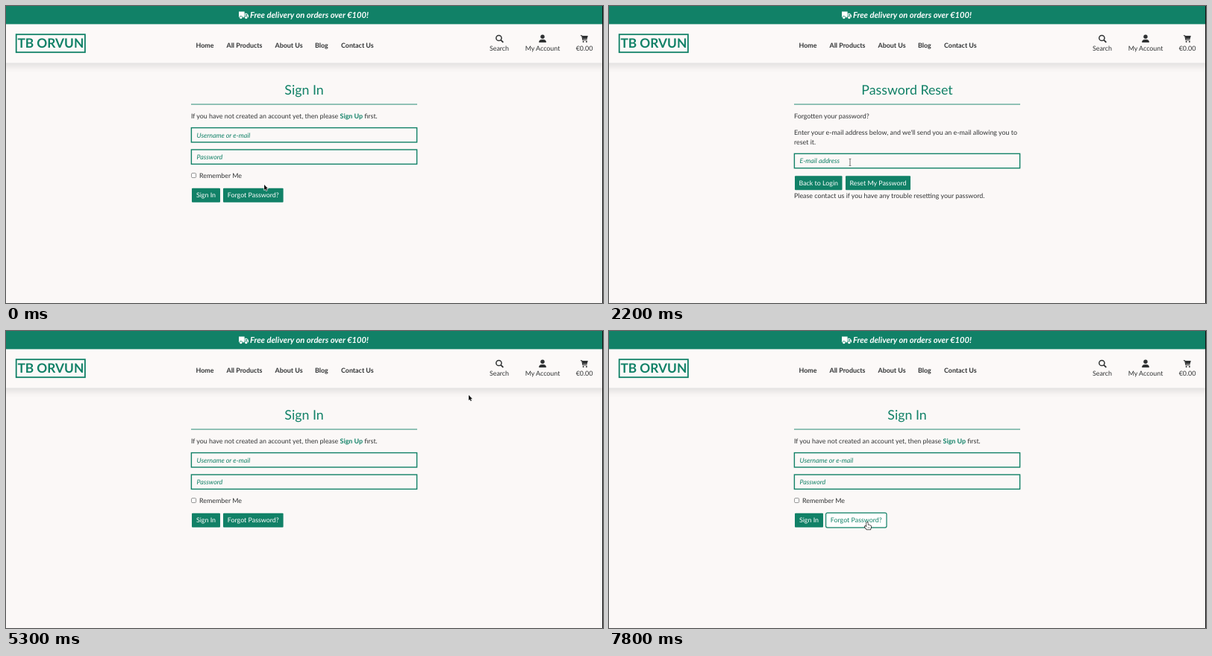
Recreate the animation shown at these times as an HTML page with a canvas. Size 800 by 399 pixels, loop 8 s.

```html
<!DOCTYPE html>
<html lang="en">
<head>
<meta charset="utf-8">
<title>Sign in and password reset</title>
<style>
html, body { margin: 0; width: 100%; height: 100%; overflow: hidden; background: #fbf8f7; }
canvas { display: block; width: 100%; height: 100%; }
</style>
</head>
<body>
<canvas id="stage"></canvas>
<script>
const W = 800, H = 399, LOOP = 8000, STEP = 100, REM = 8.89;
const GREEN = [17, 129, 103], PAPER = [251, 248, 247], WHITE = [255, 255, 255];
const rgb = c => `rgb(${c.map(Math.round).join()})`;
const mix = (a, b, k) => rgb(a.map((v, i) => v + (b[i] - v) * k));
const green = rgb(GREEN), paper = rgb(PAPER), ink = '#303233';
const EMAIL = 'vudot84029@tolvenk.com';

const canvas = document.getElementById('stage');
const ctx = canvas.getContext('2d');
const dpr = window.devicePixelRatio || 1;
canvas.width = W * dpr;
canvas.height = H * dpr;

// Pointer path: time, x, y of the hot spot
const PATH = [
  [0, 346, 240], [100, 346, 242], [300, 346, 246], [1100, 346, 246],
  [1200, 332, 228], [1500, 323, 210], [3400, 323, 210], [3600, 330, 230],
  [3800, 336, 233], [4000, 318, 233], [4200, 295, 232], [4800, 295, 232],
  [5100, 603, 100], [5200, 603, 100], [5300, 620, 86], [5500, 719, 54],
  [5900, 719, 54], [6300, 721, 93], [7100, 721, 93], [7500, 372, 278],
  [7600, 352, 262], [7800, 346, 257], [8000, 346, 257]
];

const ease = k => { k = Math.min(1, Math.max(0, k)); return k * k * (3 - 2 * k); };
const fade = (t, on, off = Infinity) => Math.min(ease((t - on) / 240), 1 - ease((t - off) / 240));
const within = (t, a, b) => t >= a && t < b;
const inside = (p, x, y, w, h) => within(p.x, x, x + w) && within(p.y, y, y + h);

function pointerAt(t) {
  const i = PATH.findIndex(p => p[0] > t);
  const [t0, x0, y0] = PATH[i - 1], [t1, x1, y1] = PATH[i];
  const k = (t - t0) / (t1 - t0);
  return { x: x0 + (x1 - x0) * k, y: y0 + (y1 - y0) * k };
}

function text(s, x, y, { size = REM, style = '', color = ink, align = 'left' } = {}) {
  ctx.font = `${style} ${size}px Lato, sans-serif`;
  ctx.textAlign = align;
  ctx.fillStyle = color;
  ctx.fillText(s, x, y);
  return ctx.measureText(s).width;
}

function rect(x, y, w, h, color) {
  ctx.fillStyle = color;
  ctx.fillRect(x, y, w, h);
}

function disc(x, y, r, color) {
  ctx.fillStyle = color;
  ctx.beginPath();
  ctx.arc(x, y, r, 0, Math.PI * 2);
  ctx.fill();
}

function line(points, color, width) {
  ctx.strokeStyle = color;
  ctx.lineWidth = width;
  ctx.beginPath();
  points.forEach(p => ctx.lineTo(...p));
  ctx.stroke();
}

function shape(d, x, y, fill, stroke, width) {
  const p = new Path2D(d);
  ctx.save();
  ctx.translate(x, y);
  ctx.lineJoin = 'round';
  if (stroke) {
    ctx.strokeStyle = stroke;
    ctx.lineWidth = width;
    ctx.stroke(p);
  }
  ctx.fillStyle = fill;
  ctx.fill(p);
  ctx.restore();
}

function button(label, x, y, w, h, k = 0) {
  ctx.beginPath();
  ctx.roundRect(x, y, w, h, 1);
  ctx.fillStyle = mix(GREEN, WHITE, k);
  ctx.fill();
  if (k > 0) {
    ctx.beginPath();
    ctx.roundRect(x - .4, y - .4, w + .8, h + .8, 2);
    ctx.strokeStyle = mix(PAPER, GREEN, k);
    ctx.lineWidth = 1.2;
    ctx.stroke();
  }
  text(label, x + w / 2, y + h / 2 + 3.1, { color: mix(WHITE, GREEN, k), align: 'center' });
}

function field(y, placeholder) {
  ctx.strokeStyle = green;
  ctx.lineWidth = 1.4;
  ctx.strokeRect(248.4, y + .4, 302.2, 19.4);
  if (placeholder) text(placeholder, 255.5, y + 13.3, { style: 'italic', color: green });
}

function title(s) {
  text(s, 399.5, 119.2, { size: REM * 2, color: green, align: 'center' });
  rect(248, 131.6, 303, .9, green);
}

function truck() {
  rect(312, 7.5, 7.6, 7.8, '#fff');
  shape('M8.2 2.2H10.6L13 4.8V7.8H8.2Z', 312, 7.5, '#fff');
  shape('M9.2 3.2H10.2L11.8 5H9.2Z', 312, 7.5, green);
  for (const x of [314.8, 321.8]) {
    disc(x, 15.6, 2.3, green);
    disc(x, 15.6, 1.7, '#fff');
  }
}

function header(accountOn) {
  ctx.save();
  ctx.shadowColor = 'rgba(0,0,0,.11)';
  ctx.shadowBlur = 9 * dpr;
  ctx.shadowOffsetY = 4 * dpr;
  rect(-20, 0, W + 40, 76.5, '#fcf9f8');
  ctx.restore();
  rect(0, 0, W, 24.4, green);
  truck();
  text('Free delivery on orders over €100!', 327, 16.2, { size: REM * 1.25, style: 'italic bold', color: '#fff' });

  ctx.strokeStyle = green;
  ctx.lineWidth = 1.8;
  ctx.strokeRect(13.7, 38.2, 92.2, 24);
  text('TB ORVUN', 59.8, 56.4, { size: 17.3, style: 'bold', color: green, align: 'center' });

  const nav = [['Home', 254.5], ['All Products', 295.5], ['About Us', 360.5], ['Blog', 414], ['Contact Us', 449]];
  for (const [s, x] of nav) text(s, x, 55.7, { style: 'bold' });

  const account = accountOn ? green : ink;
  ctx.strokeStyle = ink;
  ctx.lineWidth = 1.5;
  ctx.beginPath();
  ctx.arc(660.4, 43, 3.6, 0, Math.PI * 2);
  ctx.stroke();
  line([[663, 45.6], [666.3, 48.9]], ink, 1.8);
  disc(719, 41.2, 2.7, account);
  shape('M0 10.5Q0 6.4 4 6.4H6Q9.8 6.4 9.8 10.5Z', 714.1, 38.6, account);
  line([[769.8, 39.7], [771.6, 39.7], [773, 45.8], [778.6, 45.8]], ink, 1.1);
  shape('M2 .8H10L8.8 5.3H3Z', 769.8, 39.2, ink);
  disc(773.6, 48, 1, ink);
  disc(777.9, 48, 1, ink);
  text('Search', 661, 60.2, { align: 'center' });
  text('My Account', 719, 60.2, { color: account, align: 'center' });
  text('€0.00', 775, 60.2, { align: 'center' });
}

function signInPage(t) {
  title('Sign In');
  let x = 248;
  x += text('If you have not created an account yet, then please ', x, 150.8);
  x += text('Sign Up', x, 150.8, { style: 'bold', color: green });
  text(' first.', x, 150.8);
  field(163.2, 'Username or e-mail');
  field(192.6, 'Password');
  ctx.beginPath();
  ctx.roundRect(248.6, 224.6, 6, 6, 1.2);
  ctx.fillStyle = '#fff';
  ctx.fill();
  ctx.strokeStyle = '#777';
  ctx.lineWidth = .8;
  ctx.stroke();
  text('Remember Me', 259, 231.2);
  button('Sign In', 249, 244.8, 38, 18.9);
  button('Forgot Password?', 291, 244.8, 80.6, 18.9, t < 500 ? fade(t, 150) : fade(t, 7550));
}

function resetPage(t) {
  const filled = t >= 2400;
  title('Password Reset');
  text('Forgotten your password?', 248, 150.8);
  text("Enter your e-mail address below, and we'll send you an e-mail allowing you to", 248, 172.7);
  text('reset it.', 248, 185.6);
  field(198, filled ? '' : 'E-mail address');
  const end = 255.5 + (filled ? text(EMAIL, 255.5, 211.3) : 0);
  const caret = within(t, 1700, 2200) || within(t, 2400, 2900) || within(t, 3400, 3900);
  if (caret) rect(end + .2, 202.6, .8, 11, '#111');
  button('Back to Login', 249, 228.3, 63.5, 18.9, fade(t, 4100));
  button('Reset My Password', 317, 228.3, 87, 18.9, Math.max(fade(t, 400, 1250), fade(t, 3550, 4100)));
  text('Please contact us if you have any trouble resetting your password.', 248, 258.2);
}

function menu(p) {
  rect(687.5, 65.5, 87, 38.5, '#fff');
  [['Register', 68.5], ['Login', 86.2]].forEach(([s, y]) => {
    const on = inside(p, 687, y, 87, 17.7);
    if (on) rect(687.5, y, 87, 17.7, green);
    text(s, 700.3, y + 12.3, { color: on ? '#fff' : ink });
  });
}

function pointer(p, kind) {
  if (kind === 'beam') {
    line([[p.x, p.y - 4.5], [p.x, p.y + 4.5]], '#333', .7);
    line([[p.x - 1.4, p.y - 4.6], [p.x + 1.4, p.y - 4.6]], '#333', .6);
    line([[p.x - 1.4, p.y + 4.6], [p.x + 1.4, p.y + 4.6]], '#333', .6);
  } else if (kind === 'hand') {
    shape('M-.9 .6Q0-.5 .8 .6V3.6L4.4 4.4Q5.4 4.8 5.2 6L4.4 9.6H-.6L-3.4 6.2Q-3.6 4.9-2.4 5.2L-.9 6.2Z',
      p.x, p.y, '#fff', '#111', 1.4);
    line([[p.x + 1.2, p.y + 6], [p.x + 1.2, p.y + 8]], '#555', .5);
    line([[p.x + 2.8, p.y + 6], [p.x + 2.8, p.y + 8]], '#555', .5);
  } else {
    shape('M0 0V7.2L1.6 5.8L2.7 8.3L3.9 7.8L2.8 5.3H5Z', p.x, p.y, '#111', '#fff', 1.2);
  }
}

function draw(t) {
  const p = pointerAt(t);
  const signIn = t < 500 || t >= 4500;
  const menuOpen = within(t, 5600, 6600);
  const overAccount = inside(p, 695, 36, 48, 28);
  const overMenu = menuOpen && inside(p, 687, 65, 88, 39);
  const overButton = signIn
    ? inside(p, 248, 244, 125, 21)
    : inside(p, 248, 227, 66, 21) || inside(p, 316, 227, 89, 21);
  const overField = !signIn && inside(p, 248, 198, 303, 20);

  ctx.setTransform(canvas.width / W, 0, 0, canvas.height / H, 0, 0);
  ctx.textRendering = 'geometricPrecision';
  rect(0, 0, W, H, paper);
  header(overAccount || menuOpen);
  (signIn ? signInPage : resetPage)(t);
  if (menuOpen) menu(p);
  rect(799, 0, 1, H, '#111');
  pointer(p, overField ? 'beam' : overButton || overAccount || overMenu ? 'hand' : 'arrow');
}

const start = performance.now();
function tick() {
  const t = (performance.now() - start) % LOOP;
  draw(Math.floor(t / STEP) * STEP);
  requestAnimationFrame(tick);
}
tick();
</script>
</body>
</html>
```
